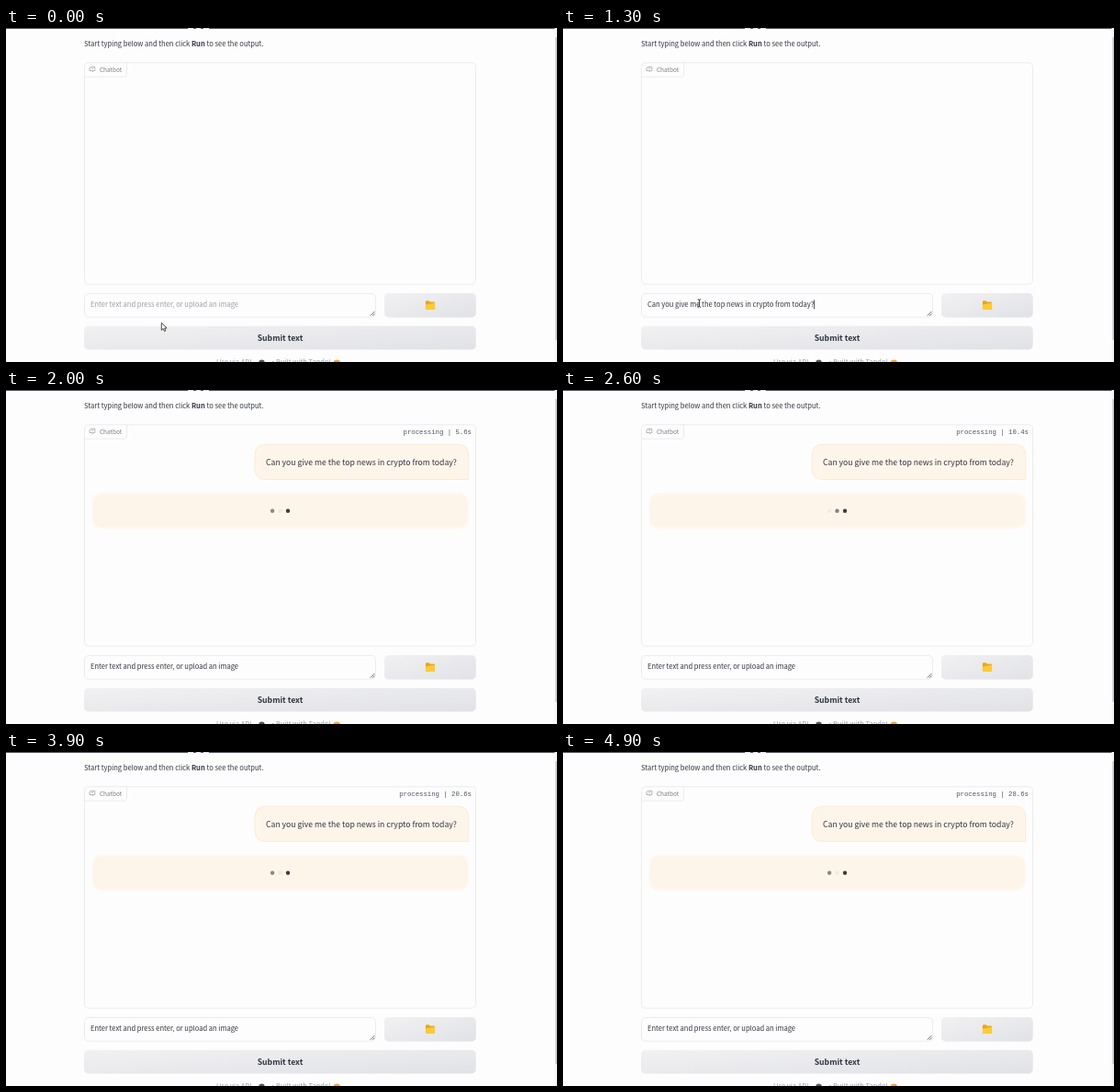
These frames come from a looping animation (600 by 364 pixels, 5 s). An HTML page:

```html
<!DOCTYPE html>
<html lang="en">
<head>
<meta charset="utf-8">
<title>Chat demo</title>
<style>
  html, body { margin: 0; width: 100%; height: 100%; overflow: hidden; background: #fefdfe; }
  svg { display: block; width: 600px; height: 364px; }
  text { font: 7.55px "Noto Sans CJK SC", "Noto Sans CJK JP", "Noto Sans CJK", "Open Sans", sans-serif; fill: #30353f; white-space: pre; }
  .b { font-weight: 700; }
  .big { font-size: 8.66px; }
  .label { font-size: 6.46px; fill: #777b84; }
  .foot { fill: #9a9ea8; }
  #timer { font: 7.3px "Liberation Mono", "Noto Sans Mono", monospace; fill: #4b5563; text-anchor: end; }
  .box { fill: none; stroke: #e7e7ea; stroke-width: .8; }
</style>
</head>
<body>
<svg viewBox="0 0 600 364">
  <defs>
    <linearGradient id="btn" x1="0" y1="0" x2="1" y2="1">
      <stop offset="0" stop-color="#f1f1f3"/>
      <stop offset="1" stop-color="#e1e2e6"/>
    </linearGradient>
    <filter id="soft" x="-5%" y="-20%" width="110%" height="140%">
      <feGaussianBlur stdDeviation=".8"/>
    </filter>
    <path id="arrow" d="M0 0V8L1.9 6.3 3.2 9.2 4.6 8.6 3.3 5.8H5.8Z" fill="#fff" stroke="#222" stroke-width=".8" stroke-linejoin="round"/>
  </defs>

  <rect width="600" height="364" fill="#fefdfe"/>
  <rect width="600" height="1" fill="#555963"/>
  <path d="M198 .5h6m3 0h5m3 0h6" stroke="#e6e6ea"/>
  <rect x="597.5" width="2.5" height="364" fill="#f4f4f5"/>
  <rect x="598.4" y="10" width="1.6" height="330" fill="#c6c6c9"/>

  <text x="85" y="19.7">Start typing below and then click <tspan class="b">Run</tspan> to see the output.</text>

  <rect class="box" x="85.5" y="37.8" width="426" height="241.4" rx="4.5"/>
  <path class="box" d="M85.5 53.2H128.5Q131.5 53.2 131.5 50.2V37.8"/>
  <g fill="none" stroke="#8d9099" stroke-width=".65">
    <path d="M92.6 42.4H96.8V46.5H95.5L94.4 47.8V46.5M92.6 42.4L91 43.5V46.5H94.4M92.8 44.1H95.3"/>
  </g>
  <text class="label" x="102" y="47.9">Chatbot</text>

  <g id="chat">
    <text id="timer" x="507" y="47.8"></text>
    <path d="M283 59.3H492Q503.7 59.3 503.7 71V97.5H283Q271 97.5 271 85.5V71.3Q271 59.3 283 59.3Z" fill="#fef5ea" stroke="#fbe7cd" stroke-width=".8"/>
    <text class="big" x="283" y="81.9">Can you give me the top news in crypto from today?</text>
    <rect id="reply" rx="10" fill="#fef5ea" filter="url(#soft)"/>
    <g id="dots" fill="#29262a">
      <circle cx="290.1" cy="131.8" r="2.2"/>
      <circle cx="298.5" cy="131.8" r="2.2"/>
      <circle cx="307" cy="131.8" r="2.2"/>
    </g>
  </g>

  <rect class="box" x="85.5" y="289.4" width="317" height="25.8" rx="4.5"/>
  <text id="field" x="92" y="303.9"></text>
  <rect id="caret" y="296.3" width=".8" height="10" fill="#222"/>
  <path d="M396.8 313.6L401.4 309M399.3 313.6L401.4 311.5" stroke="#444" stroke-width=".8"/>

  <rect x="412" y="289" width="99.7" height="26.4" rx="4.5" fill="url(#btn)"/>
  <path d="M456.9 298.3Q456.9 297.3 457.9 297.3H460.6L461.7 298.5H466Q467 298.5 467 299.5V306.4H456.9Z" fill="#e9a51d"/>
  <path d="M457 301.4L467.2 299.4V305.5Q467.2 306.7 466 306.7H458Q457 306.7 457 305.5Z" fill="#fccb35"/>

  <rect x="85" y="324.7" width="426.7" height="25.7" rx="4.5" fill="url(#btn)"/>
  <text class="b big" x="298.5" y="340.9" text-anchor="middle">Submit text</text>

  <text class="foot" x="229" y="367.3">Use via API</text>
  <circle cx="278.5" cy="365" r="3.4" fill="#5b5558"/>
  <text class="foot" x="287" y="367.3">·</text>
  <text class="foot" x="294" y="367.3">Built with Tandel</text>
  <circle cx="360.3" cy="365.6" r="4" fill="#f7a53b"/>

  <use id="pointer" href="#arrow"/>
  <path id="beam" d="M146.6 295.7Q148.4 295.7 148.4 296.8V303.2Q148.4 304.3 146.6 304.3M150.2 295.7Q148.4 295.7 148.4 296.8M148.4 303.2Q148.4 304.3 150.2 304.3" fill="none" stroke="#222" stroke-width=".9"/>
</svg>
<script>
const LOOP = 5000, STEP = 100;
const PROMPT = "Can you give me the top news in crypto from today?";
const HINT = "Enter text and press enter, or upload an image";
// [time in ms, seconds on the counter]
const CLOCK = [[1400, .8], [2600, 10.4], [3900, 20.6], [4900, 28.6]];

const $ = id => document.getElementById(id);
const show = (id, on) => $(id).style.display = on ? "" : "none";
const set = (el, attrs) => { for (const k in attrs) el.setAttribute(k, attrs[k]); };
const field = $("field"), dots = [...$("dots").children];

function elapsed(t) {
  let i = 0;
  while (i < CLOCK.length - 2 && t >= CLOCK[i + 1][0]) i++;
  const [t0, s0] = CLOCK[i], [t1, s1] = CLOCK[i + 1];
  return s0 + (s1 - s0) * (t - t0) / (t1 - t0);
}

// One-second fade in and out, eased on both halves
function flash(phase) {
  const p = phase - Math.floor(phase);
  const x = 1 - Math.abs(2 * p - 1);
  return x * x * (3 - 2 * x);
}

function draw(t) {
  const waiting = t >= 1400, focused = t >= 100 && !waiting;
  const count = focused ? Math.max(0, Math.min(PROMPT.length, Math.round(23 + (t - 700) * .045))) : 0;

  field.textContent = count ? PROMPT.slice(0, count) : HINT;
  field.style.fill = count || waiting ? "#30353f" : "#9b9ea6";
  show("caret", focused);
  if (focused) $("caret").setAttribute("x", 92 + (count ? field.getComputedTextLength() : 0));

  show("beam", focused);
  show("pointer", t < 100 || (waiting && t < 1600));
  $("pointer").setAttribute("transform", waiting ? "translate(148 299)" : "translate(169.3 321.3)");

  show("chat", waiting);
  if (!waiting) return;
  const s = elapsed(t), inset = t < 1500 ? 1.5 : 0;
  $("timer").textContent = `processing | ${s.toFixed(1)}s`;
  set($("reply"), { x: 93.8 + inset, y: 112.4 + inset / 2, width: 410 - 2 * inset, height: 38.4 - inset });
  dots.forEach((d, i) => d.setAttribute("opacity", flash(s + .66 - i * .33).toFixed(3)));
}

let start;
function tick(now) {
  start ??= now;
  const t = (now - start) % LOOP;
  draw(Math.floor(t / STEP) * STEP);
  requestAnimationFrame(tick);
}
draw(0);
requestAnimationFrame(tick);
</script>
</body>
</html>
```
